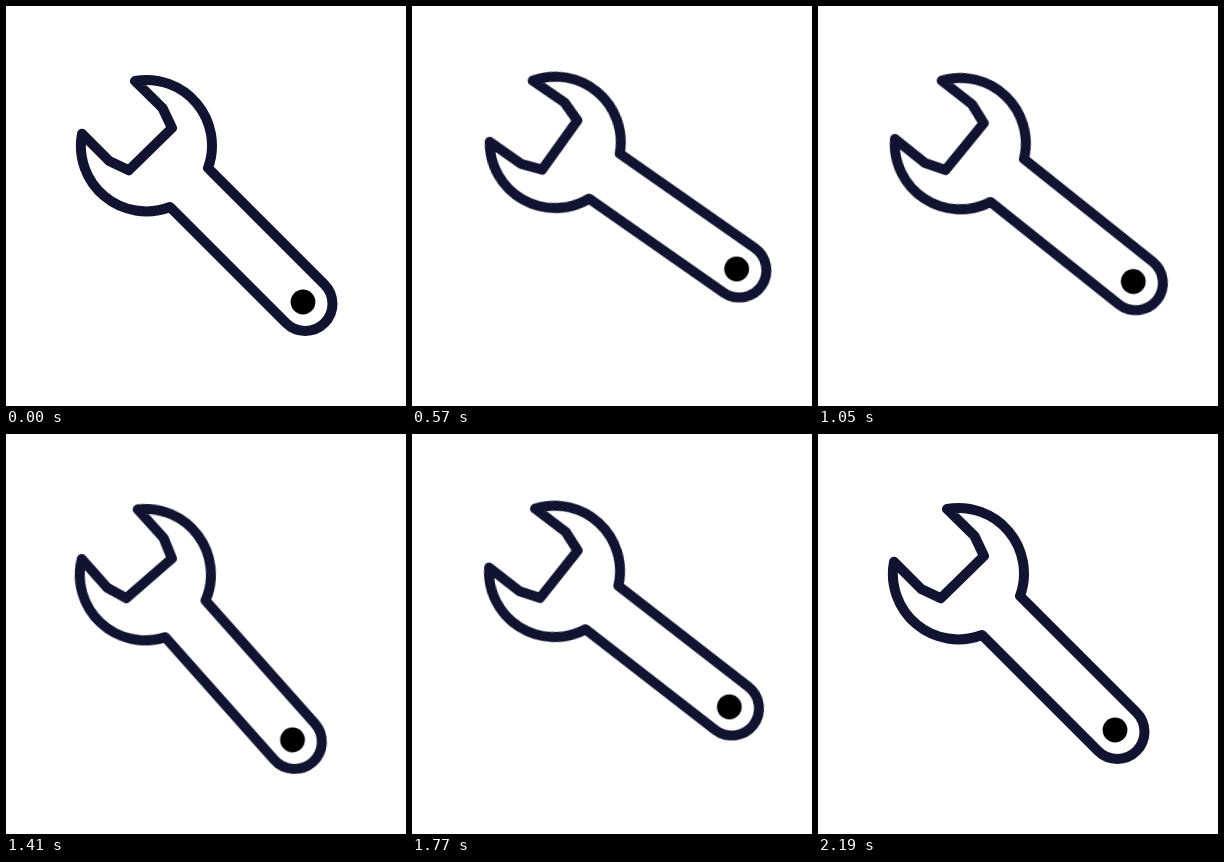
An HTML page for the animation above (2250 ms loop, 400 by 400 pixels).

```html
<!DOCTYPE html>
<html lang="en">
<head>
<meta charset="utf-8">
<title>Turning wrench</title>
<style>
  html, body { margin: 0; width: 100%; height: 100%; overflow: hidden; background: #fff; }
  svg { display: block; width: 100%; height: 100%; }
  #wrench { transform-origin: 123px 122px; }
  #body {
    fill: none;
    stroke: #121331;
    stroke-width: 10;
    stroke-linecap: round;
    stroke-linejoin: round;
  }
</style>
</head>
<body>
<svg viewBox="0 0 400 400">
  <g id="wrench">
    <path id="body" d="M129 75 L156.5 102 L166 122 L122.8 164.3 L103.2 155 L76 127.8
      A65.5 65.5 0 0 0 164 201 L280 317 A27.2 27.2 0 0 0 318.5 278.5 L202 162
      A65.5 65.5 0 0 0 129 75 Z"/>
    <circle cx="297" cy="296" r="12.4"/>
  </g>
</svg>
<script>
  const LOOP = 2250, STEP = 30, LAST = 2190;
  const HIGH = 22.3, LOW = -10.3;

  // Quick near the high end, slow near the low end.
  const START = 'cubic-bezier(.33, 0, .67, 1)';
  const DOWN = 'cubic-bezier(.3, 0, .2, 1)';
  const UP = 'cubic-bezier(.8, 0, .6, 1)';
  const SETTLE = 'cubic-bezier(.6, 0, .3, 1)';

  // time in ms, angle in degrees, easing to the next pose
  const poses = [
    [0, 0, START],
    [153, HIGH, DOWN],
    [534, LOW, UP],
    [839, HIGH, DOWN],
    [1194, LOW, UP],
    [1545, HIGH, DOWN],
    [1902, LOW, SETTLE],
    [2200, 0, 'linear'],
    [LOOP, 0, 'linear']
  ];

  const swing = document.getElementById('wrench').animate(
    poses.map(([time, angle, easing]) => ({
      offset: time / LOOP,
      transform: `rotate(${angle}deg)`,
      easing
    })),
    { duration: LOOP, fill: 'both' }
  );
  swing.pause();

  const start = performance.now();
  function draw(now) {
    const t = Math.max(0, now - start) % LOOP;
    swing.currentTime = Math.min(LAST, Math.floor(t / STEP) * STEP);
    requestAnimationFrame(draw);
  }
  draw(start);
</script>
</body>
</html>
```
